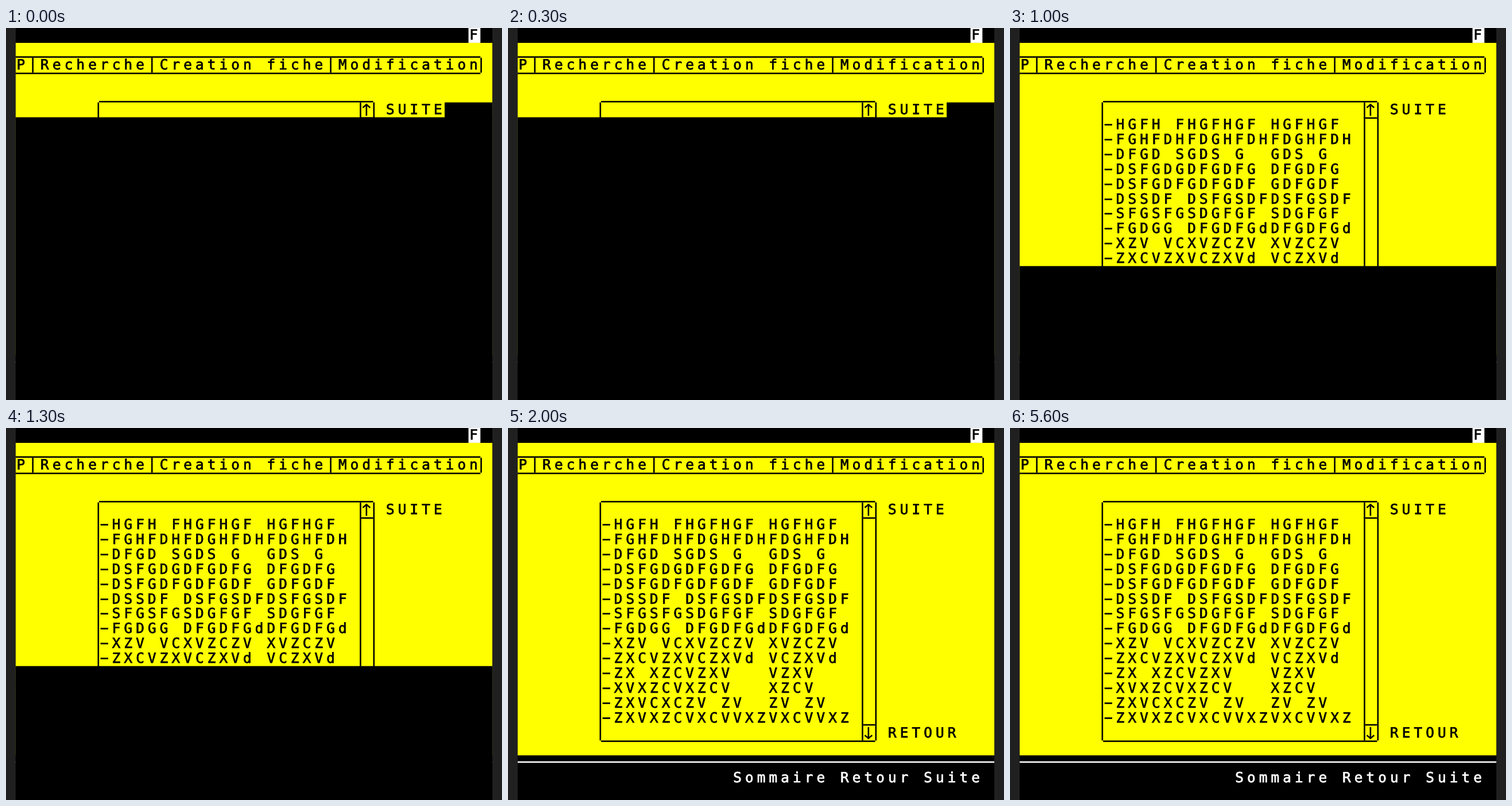
Animation of 864 by 648 pixels, one loop 8 s. Source, as an HTML page:

```html
<!DOCTYPE html>
<html lang="fr">
<head>
<meta charset="utf-8">
<title>Videotex</title>
<style>
  @property --row { syntax: "<number>"; inherits: true; initial-value: 0; }
  @property --col { syntax: "<number>"; inherits: true; initial-value: 0; }

  html, body { margin: 0; width: 100%; height: 100%; overflow: hidden; background: #202020; }
  svg { display: block; width: 100%; height: 100%; animation: receive 8s step-end infinite; }
  text {
    font: 9.4px "DejaVu Sans Mono", "Noto Sans Mono", monospace;
    text-anchor: middle; white-space: pre; text-rendering: geometricPrecision;
    fill: currentColor; stroke: currentColor; stroke-width: .3px;
  }

  /* Black covers everything after the cell received last. */
  .rest {
    x: calc(var(--col) * 8px); y: calc(var(--row) * 10px);
    width: calc(320px - var(--col) * 8px); height: 12px;
  }
  .below { y: calc(var(--row) * 10px + 10px); width: 320px; height: 250px; }

  @keyframes receive {
    0%        { --row: 5;  --col: 36; }
    6.25%     { --row: 11; --col: 9; }
    12.5%     { --row: 16; --col: 0; }
    18.75%    { --row: 23; --col: 0; }
    25%, 100% { --row: 25; --col: 0; }
  }
</style>
</head>
<body>
<svg viewBox="-6.5 0 333 250" preserveAspectRatio="none">
  <g id="page"></g>
  <rect class="rest"/>
  <rect class="below"/>
</svg>
<script>
  const CELL_W = 8, CELL_H = 10;
  const page = document.getElementById("page");

  function add(tag, attributes) {
    const node = document.createElementNS("http://www.w3.org/2000/svg", tag);
    for (const name in attributes) node.setAttribute(name, attributes[name]);
    page.append(node);
    return node;
  }

  const fill = (x, y, width, height, color = "#000") =>
    add("rect", { x, y, width, height, fill: color });
  const across = (y, from, to, color) => fill(from, y, to - from, 1, color);
  const down = (x, from, to) => fill(x, from, 1, to - from);

  // Writes a string on the 40 x 25 character grid, one letter per cell.
  function write(row, col, string, color = "#000") {
    const x = [...string].map((_, i) => (col + i) * CELL_W + 3.5).join(" ");
    add("text", { x, y: row * CELL_H + 7.9, color }).textContent = string;
  }

  // Arrow inside a cell; dir is -1 for up and 1 for down.
  function arrow(row, col, dir) {
    const x = col * CELL_W + 3.5, middle = row * CELL_H + 5;
    const tip = middle + dir * 4, wing = tip - dir * 2.5;
    down(x - .5, middle - 4, middle + 4);
    add("path", {
      d: `M${x - 2.5} ${wing}L${x} ${tip - dir * .5}L${x + 2.5} ${wing}`,
      fill: "none", stroke: "#000"
    });
  }

  function menu(row, labels) {
    const top = row * CELL_H, end = 39 * CELL_W;
    across(top - 1, 0, end);
    across(top + CELL_H, 0, end);
    let col = 0;
    for (const label of labels) {
      write(row, col, label);
      col += label.length;
      down(Math.min(col * CELL_W + 3, end), top, top + CELL_H);
      col++;
    }
  }

  function listBox(row, rows, col, cols, lines) {
    const top = row * CELL_H, bottom = top + rows * CELL_H;
    const left = col * CELL_W, right = left + cols * CELL_W;
    const bar = right - CELL_W;
    across(top - 1, left, right);
    across(bottom, left, right);
    for (const x of [left - 1, bar - 1, right]) down(x, top, bottom);
    across(top + CELL_H, bar, right);
    across(bottom - CELL_H - 1, bar, right);
    arrow(row, col + cols - 1, -1);
    arrow(row + rows - 1, col + cols - 1, 1);
    lines.forEach((line, i) => write(row + 1 + i, col, "−" + line));
  }

  fill(0, 0, 320, 250);
  fill(38 * CELL_W, 0, CELL_W, CELL_H, "#fff");
  fill(0, CELL_H, 320, 21 * CELL_H, "#ff0");
  across(224, 0, 320, "#fff");

  write(0, 38, "F");
  menu(2, ["P", "Recherche", "Creation fiche", "Modification"]);
  listBox(5, 16, 7, 23, [
    "HGFH FHGFHGF HGFHGF",
    "FGHFDHFDGHFDHFDGHFDH",
    "DFGD SGDS G  GDS G",
    "DSFGDGDFGDFG DFGDFG",
    "DSFGDFGDFGDF GDFGDF",
    "DSSDF DSFGSDFDSFGSDF",
    "SFGSFGSDGFGF SDGFGF",
    "FGDGG DFGDFGdDFGDFGd",
    "XZV VCXVZCZV XVZCZV",
    "ZXCVZXVCZXVd VCZXVd",
    "ZX XZCVZXV   VZXV",
    "XVXZCVXZCV   XZCV",
    "ZXVCXCZV ZV  ZV ZV",
    "ZXVXZCVXCVVXZVXCVVXZ"
  ]);
  write(5, 31, "SUITE");
  write(20, 31, "RETOUR");
  write(23, 18, "Sommaire Retour Suite", "#fff");
</script>
</body>
</html>
```
